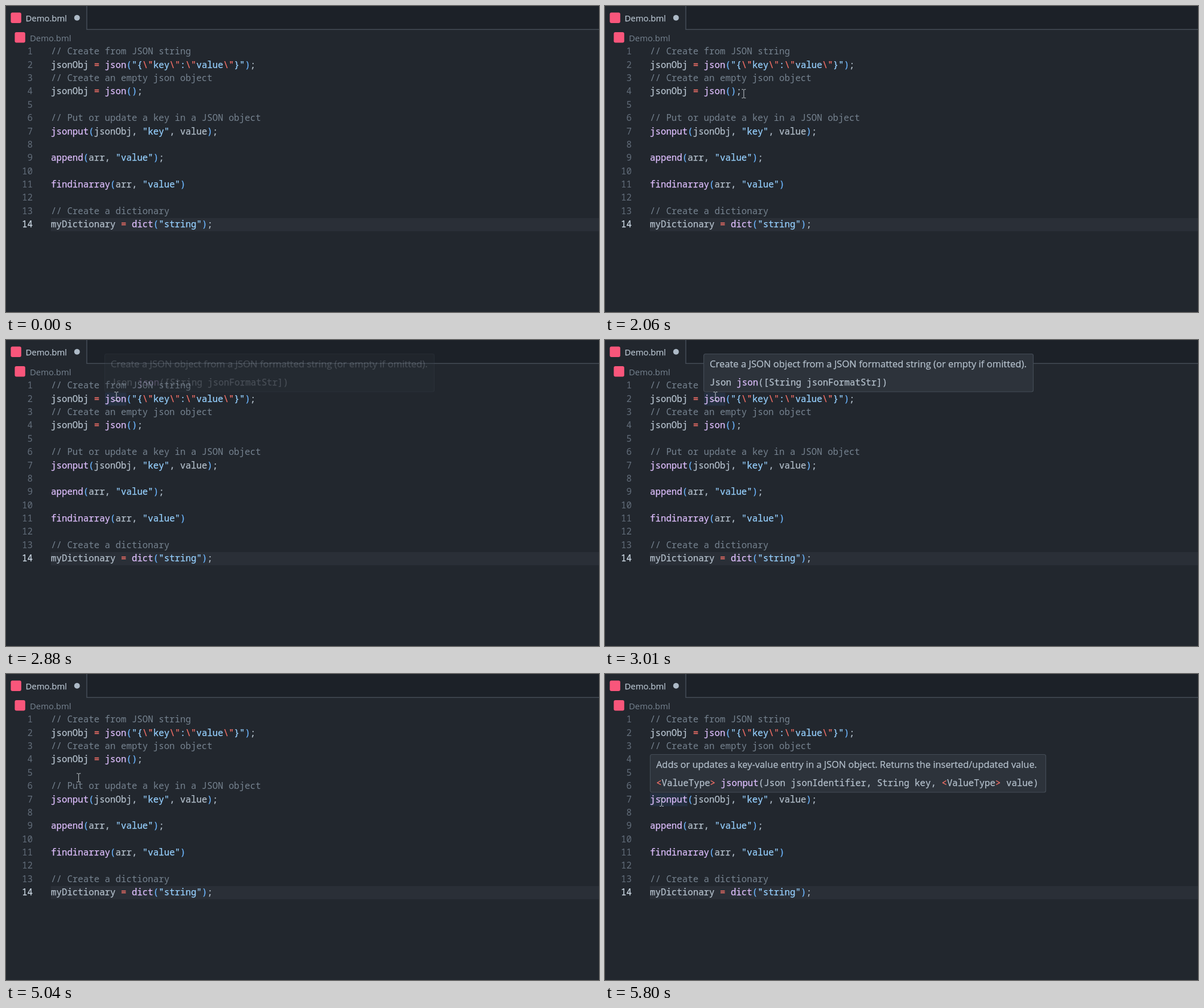
Write an HTML page that moves like this. It is 1042 by 538 pixels and loops after 8000 ms.

```html
<!DOCTYPE html>
<html lang="en">
<head>
<meta charset="utf-8">
<title>Hover documentation demo</title>
<style>
  html, body { margin: 0; width: 100%; height: 100%; overflow: hidden; background: #22272e; }
  svg { display: block; width: 1042px; height: 538px; }
  text { color: #b4c0cc; stroke-width: 0.25; }
  text, tspan { fill: currentColor; stroke: currentColor; }
  .ui { font: 14.85px "Open Sans", sans-serif; }
  .code { font: 15.77px "Noto Sans Mono", monospace; }
  .muted, .comment { color: #768390; stroke: none; }
  .number { color: #636e7b; text-anchor: end; stroke: none; }
  .active { color: #cdd9e5; stroke: currentColor; }
  .string { color: #96d0ff; }
  .operator { color: #f47067; }
  .call { color: #dcbdfb; }
  .bracket { color: #6cb6ff; }
  .tip .bracket { color: inherit; }
  .word { fill: #253141; }
  .tip rect { fill: #2d333b; stroke: #444c56; stroke-width: 1.2; }
</style>
</head>
<body>
<svg viewBox="0 0 1042 538">
  <rect width="1042" height="538" fill="#22272e"/>
  <rect x="142" width="900" height="41" fill="#1c2128"/>
  <path d="M142 0V41.2H1042" fill="none" stroke="#444c56" stroke-width="1.6"/>
  <rect x="8.4" y="11.6" width="18.4" height="18.4" rx="3" fill="#f9567b"/>
  <text class="ui" x="34.5" y="26.5">Demo.bml</text>
  <circle cx="124.8" cy="20.8" r="5" fill="#adbac7"/>
  <rect x="15.4" y="46" width="18.4" height="18.4" rx="3" fill="#f9567b"/>
  <text class="ui muted" x="42" y="62">Demo.bml</text>
  <rect x="79" y="373" width="963" height="23" fill="#2a2f37"/>
  <g id="words"></g>
  <g id="lines"></g>
  <g id="tips"></g>
  <path id="cursor" fill="none" stroke="#c8ced4"
    d="M-3.5-7.5H-1L0-6.5L1-7.5H3.5M0-6.5V6.5M-3.5 7.5H-1L0 6.5L1 7.5H3.5"/>
</svg>
<script>
const LOOP = 8000, STEP = 68.2, ROW = 23.38;
const $ = id => document.getElementById(id);

const source = String.raw`// Create from JSON string
jsonObj = json("{\"key\":\"value\"}");
// Create an empty json object
jsonObj = json();

// Put or update a key in a JSON object
jsonput(jsonObj, "key", value);

append(arr, "value");

findinarray(arr, "value")

// Create a dictionary
myDictionary = dict("string");`.split("\n");

const tips = [
  { x: 173.5, y: 24.5, width: 579, size: 16.6, word: [174, 92.5, 37.5],
    show: 2880, hide: 4770, fade: [0.25, 0.6],
    doc: "Create a JSON object from a JSON formatted string (or empty if omitted).",
    signature: "Json json([String jsonFormatStr])" },
  { x: 79.5, y: 141.5, width: 695, size: 16.4, word: [79, 209.5, 66],
    show: 5730, hide: LOOP, fade: [0.6],
    doc: "Adds or updates a key-value entry in a JSON object. Returns the inserted/updated value.",
    signature: "&lt;ValueType&gt; jsonput(Json jsonIdentifier, String key, &lt;ValueType&gt; value)" },
];

// Pointer moves: start time, number of steps, ease-out power, end point
const startPoint = [633.5, 584];
const moves = [
  { at: 850, steps: 7, power: 2, to: [507.5, 360] },
  { at: 1650, steps: 12, power: 2.17, to: [197.5, 118] },
  { at: 2470, steps: 4, power: 2, to: [194, 99] },
  { at: 4700, steps: 12, power: 1.8, to: [101, 216] },
  { at: 5520, steps: 5, power: 1, to: [99.5, 225] },
];

const span = (kind, text) => `<tspan class="${kind}">${text}</tspan>`;

function highlight(line) {
  const tokens = /(\/\/.*)|("(?:\\.|[^"\\])*")|(=|&[lg]t;)|(\w+(?=\())|([()])/g;
  return line.replace(tokens, (text, comment, string, operator, call) =>
    comment ? span("comment", text) :
    string ? span("string", text.replace(/\\"/g, m => span("operator", m))) :
    span(operator ? "operator" : call ? "call" : "bracket", text));
}

$("lines").innerHTML = source.map((line, i) => {
  const y = Math.round(85.3 + ROW * i);
  const active = i === source.length - 1 ? "active" : "";
  return `<text class="code number ${active}" x="47" y="${y}">${i + 1}</text>
    <text class="code" x="79" y="${y}">${highlight(line)}</text>`;
}).join("");

$("words").innerHTML = tips.map(({ word: [x, y, width] }) =>
  `<rect class="word" x="${x}" y="${y}" width="${width}" height="23"/>`).join("");

$("tips").innerHTML = tips.map(tip =>
  `<g class="tip" transform="translate(${tip.x} ${tip.y})">
    <rect width="${tip.width}" height="66.5" rx="3"/>
    <text class="ui" x="10.5" y="23.5" style="font-size:${tip.size}px">${tip.doc}</text>
    <text class="code" x="10.5" y="55">${highlight(tip.signature)}</text>
  </g>`).join("");

function pointerAt(time) {
  let [x, y] = startPoint;
  for (const { at, steps, power, to } of moves) {
    if (time < at) break;
    const step = Math.min(steps, Math.floor((time - at) / STEP + 0.05) + 1);
    const eased = 1 - (1 - step / steps) ** power;
    x += (to[0] - x) * eased;
    y += (to[1] - y) * eased;
  }
  return [x, y];
}

function draw() {
  const time = performance.now() % LOOP;
  $("cursor").setAttribute("transform", `translate(${pointerAt(time)})`);
  tips.forEach((tip, i) => {
    const visible = time >= tip.show && time < tip.hide;
    const step = Math.floor((time - tip.show) / 65);
    $("words").children[i].setAttribute("opacity", visible ? 1 : 0);
    $("tips").children[i].setAttribute("opacity", visible ? tip.fade[step] ?? 1 : 0);
  });
  requestAnimationFrame(draw);
}
draw();
</script>
</body>
</html>
```
